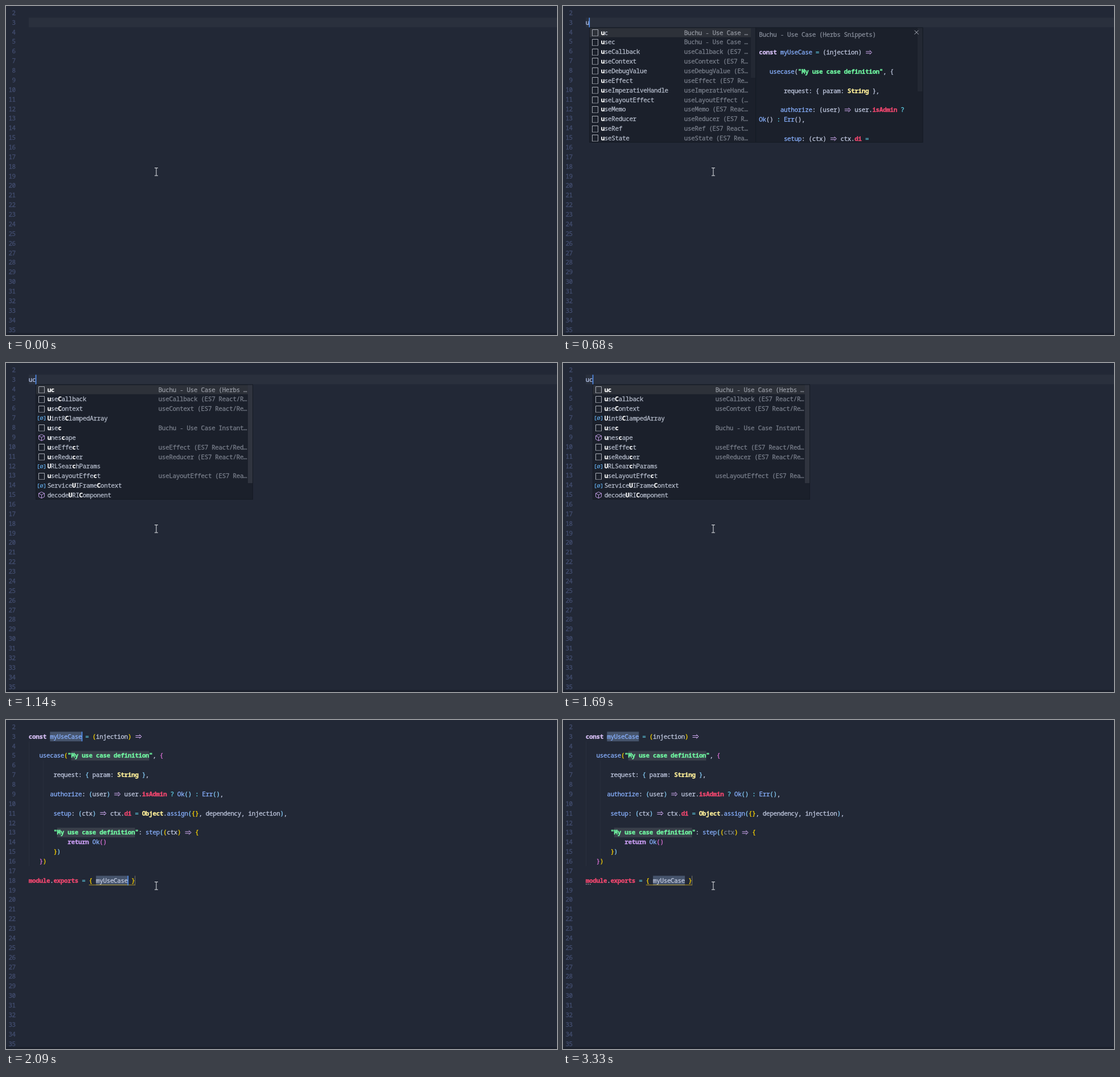
Write an HTML page with a canvas that moves like this. It is 968 px wide and 578 px high and loops after 3790 ms.

```html
<!DOCTYPE html>
<html lang="en">
<head>
<meta charset="utf-8">
<title>Snippet completion</title>
<style>
  html, body { margin: 0; width: 100%; height: 100%; overflow: hidden; background: #222836; }
  canvas { display: block; width: 968px; height: 578px; }
</style>
</head>
<body>
<canvas id="stage" width="968" height="578"></canvas>
<script>
const W = 968, H = 578, LOOP = 3790;
const CHAR = 6.22, LINE = 16.87, LEFT = 40, SIZE = 10.9;
const canvas = document.getElementById('stage');
const ctx = canvas.getContext('2d');

const PLAIN = '#bfc7de';
const COLORS = {
  d: PLAIN, k: '#d6bff5', b: '#86aefb', c: '#5fcfe6', a: '#cfa9f0',
  g: '#70f8a2', y: '#fff09a', r: '#f2476f', p: '#c79bf0'
};
const WEIGHTS = { y: 700, k: 600, g: 600, r: 600, p: 600 };
const BRACKETS = ['#ffd700', '#da70d6', '#87cefa'];

// Each token is a colour key followed by its text; tokens are split by "~".
const CODE = {
  3: 'kconst~d ~bmyUseCase~d ~c=~d (injection) ~a=>',
  5: 'd   ~busecase~d(~g"My use case definition"~d, {',
  7: 'd       request: { param: ~yString~d },',
  9: 'd      ~bauthorize~d: (user) ~a=>~d user.~risAdmin~d ~c?~d ~bOk~d() ~c:~d ~bErr~d(),',
  11: 'd       ~bsetup~d: (ctx) ~a=>~d ctx.~rdi~d ~c=~d ~yObject~d.~bassign~d({}, dependency, injection),',
  13: 'd       ~g"My use case definition"~d: ~bstep~d((ctx) ~a=>~d {',
  14: 'd           ~preturn~d ~bOk~d()',
  15: 'd       })',
  16: 'd   })',
  18: 'rmodule~d.~rexports~d ~c=~d { myUseCase }'
};

const DOCS = [
  [81.5, 'kconst~d ~bmyUseCase~d ~c=~d (injection) ~a=>'],
  [115.2, 'd   ~busecase~d(~g"My use case definition"~d, {'],
  [149, 'd       request: { param: ~yString~d },'],
  [182.5, 'd      ~bauthorize~d: (user) ~a=>~d user.~risAdmin~d ~c?'],
  [199.4, 'bOk~d() ~c:~d ~bErr~d(),'],
  [233.2, 'd       ~bsetup~d: (ctx) ~a=>~d ctx.~rdi~d ~c=']
];

// "^" marks the next letter as matched.
const LIST_U = ('^uc ^usec ^useCallback ^useContext ^useDebugValue ^useEffect ' +
  '^useImperativeHandle ^useLayoutEffect ^useMemo ^useReducer ^useRef ^useState').split(' ');
const LIST_UC = ('^u^c ^use^Callback ^use^Context ^Uint8^ClampedArray ^use^c ^unes^cape ' +
  '^useEffe^ct ^useRedu^cer ^URLSear^chParams ^useLayoutEffe^ct ' +
  'Service^UIFrame^Context decode^URI^Component').split(' ');
const METHODS = ['unescape', 'decodeURIComponent'];

const lineY = n => 29 + (n - 3) * LINE;
const colX = c => LEFT + c * CHAR;

function rect(x, y, w, h, color) {
  ctx.fillStyle = color;
  ctx.fillRect(x, y, w, h);
}

function path(points, color, width = 1, close = false) {
  ctx.beginPath();
  points.forEach(([x, y], i) => i ? ctx.lineTo(x, y) : ctx.moveTo(x, y));
  if (close) ctx.closePath();
  ctx.strokeStyle = color;
  ctx.lineWidth = width;
  ctx.stroke();
}

function arrow(x, y, color) {
  path([[x + 1, y - 1.5], [x + 9.5, y - 1.5]], color);
  path([[x + 1, y + 1.5], [x + 9.5, y + 1.5]], color);
  path([[x + 7.6, y - 3.7], [x + 11.6, y], [x + 7.6, y + 3.7]], color);
}

// One character, centred in its grid cell; the thin outline gives it body.
function glyph(ch, x, y, color, weight = 500) {
  if (ch === ' ') return;
  ctx.font = `${weight} ${SIZE}px "Noto Sans Mono", "DejaVu Sans Mono", monospace`;
  ctx.textAlign = 'center';
  ctx.fillStyle = ctx.strokeStyle = color;
  ctx.lineWidth = .3;
  ctx.fillText(ch, x + CHAR / 2, y + 3.7);
  ctx.strokeText(ch, x + CHAR / 2, y + 3.7);
}

function text(str, x, y, color, weight) {
  [...str].forEach((ch, i) => glyph(ch, x + i * CHAR, y, color, weight));
}

function tokens(line, x, y, colored, pick) {
  for (const token of line.split('~')) {
    const key = token[0], str = token.slice(1);
    const color = colored ? COLORS[key] : PLAIN;
    if (str === '=>') {
      arrow(x, y, color);
    } else {
      [...str].forEach((ch, i) =>
        glyph(ch, x + i * CHAR, y, pick && pick(ch) || color, colored ? WEIGHTS[key] : 500));
    }
    x += str.length * CHAR;
  }
}

function bracketPicker() {
  let depth = 0;
  return ch => {
    if ('({'.includes(ch)) return BRACKETS[depth++ % 3];
    if (')}'.includes(ch)) return BRACKETS[--depth % 3];
  };
}

function icon(kind, x, y) {
  if (kind === 'snippet') {
    const c = '#a9adb6', top = y - 5.5, bottom = y + 5.5;
    path([[x + .5, bottom], [x + .5, top], [x + 10.5, top], [x + 10.5, bottom]], c);
    ctx.setLineDash([1.5, .7]);
    path([[x, bottom], [x + 11, bottom]], c);
    ctx.setLineDash([]);
  } else if (kind === 'method') {
    const c = '#b896dc', m = x + 5.5;
    path([[m, y - 5.5], [x + 10.5, y - 3], [x + 10.5, y + 3], [m, y + 5.5],
      [x + .5, y + 3], [x + .5, y - 3]], c, 1, true);
    path([[x + .5, y - 3], [m, y - .3], [x + 10.5, y - 3]], c);
    path([[m, y - .3], [m, y + 5.5]], c);
  } else {
    const c = '#62aff0';
    path([[x + 1.5, y - 3.5], [x - .5, y - 3.5], [x - .5, y + 3.5], [x + 1.5, y + 3.5]], c);
    path([[x + 9.5, y - 3.5], [x + 11.5, y - 3.5], [x + 11.5, y + 3.5], [x + 9.5, y + 3.5]], c);
    ctx.beginPath();
    ctx.arc(x + 5.5, y, 2.4, 0, 7);
    ctx.stroke();
    path([[x + 2.8, y + 2.7], [x + 8.2, y - 2.7]], c);
  }
}

function detailOf(name) {
  if (name === 'uc') return 'Buchu - Use Case (Herbs Snippets)';
  if (name === 'usec') return 'Buchu - Use Case Instantiate (Herbs Snippets)';
  return name.startsWith('use') ? name + ' (ES7 React/Redux/GraphQL snippets)' : '';
}

function suggestions(list, x, width, detailX, chars, thumbH, thumbColor) {
  rect(x, 38, width, 201.5, '#1b202b');
  rect(x, 38.5, width, LINE - .5, '#2d3139');
  rect(x + width - 9, 38, 9, thumbH, thumbColor);
  list.forEach((item, row) => {
    const y = 46.8 + row * LINE;
    const name = item.replaceAll('^', '');
    const detail = detailOf(name);
    icon(detail ? 'snippet' : METHODS.includes(name) ? 'method' : 'variable', x + 4, Math.round(y));
    let tx = x + 19.8, hit = false;
    for (const ch of item) {
      if (ch === '^') { hit = true; continue; }
      glyph(ch, tx, y, hit ? '#ffffff' : '#b3bac9', hit ? 700 : 500);
      hit = false;
      tx += CHAR;
    }
    if (detail) text(detail.slice(0, chars - 1) + '…', detailX, y, row ? '#787e8a' : '#92969f');
  });
  border(x, width);
}

function border(x, width) {
  ctx.strokeStyle = '#151a24';
  ctx.lineWidth = 1;
  ctx.strokeRect(x - .5, 38, width, 201.5);
}

function docs(x, thumbColor) {
  rect(x, 38, 293, 201.5, '#1b202b');
  rect(x + 283.5, 38, 9, 112, thumbColor);
  text('Buchu - Use Case (Herbs Snippets)', x + 5, 50, '#858b98');
  path([[x + 278, 42.8], [x + 285, 49.8]], '#b0b5c0');
  path([[x + 285, 42.8], [x + 278, 49.8]], '#b0b5c0');
  for (const [y, line] of DOCS) tokens(line, x + 5, y, true);
  border(x, 293);
}

function caret(x, n) {
  rect(x, lineY(n) - 8.4, 1.6, LINE, '#5290f0');
}

function base() {
  rect(0, 0, W, H, '#222836');
  rect(0, 574.5, W, 3.5, '#1b202c');
  for (let n = 2; n <= 35; n++) {
    text(String(n), 17 - String(n).length * CHAR, lineY(n), '#434e70', 400);
  }
}

function typing(t) {
  rect(LEFT, 20.5, W - LEFT, LINE, '#2a303d');
  if (t < 450) return;
  const word = t < 760 ? 'u' : 'uc';
  text(word, LEFT, 29, t < 530 ? PLAIN : '#b5c4ea');
  if (t >= 1140) {
    suggestions(LIST_UC, 53, 381, 268, 25, 173, '#30343f');
  } else if (t >= 760) {
    suggestions(LIST_UC, 53, 292, 219, 18, 173, '#363b45');
    docs(345.5, '#323741');
  } else if (t >= 680) {
    suggestions(LIST_U, 47, 292, 213, 18, 88, '#232833');
    docs(339.5, '#232833');
  }
  if (t < 1220 || t >= 1690) caret(colX(word.length) - .7, 3);
}

function block(col, length, n, color) {
  rect(colX(col), lineY(n) - 8.4, length * CHAR, LINE, color);
}

function guide(col, from, to) {
  rect(colX(col), lineY(from) - 8.4, 1, (to - from + 1) * LINE, '#292f3e');
}

function inserted(t) {
  guide(0, 4, 16);
  guide(4, 6, 15);
  block(6, 9, 3, '#46546c');
  block(19, 9, 18, '#46546c');
  block(12, 22, 5, '#393f4a');
  block(8, 22, 13, '#393f4a');

  const pick = t >= 2090 ? bracketPicker() : null;
  for (const [n, line] of Object.entries(CODE)) {
    const y = lineY(+n);
    tokens(line, LEFT, y, t >= 1920 || n === '3', pick);
    if (n === '13' && t >= 2240) {
      rect(colX(39), y - 6, 3 * CHAR, 12, '#222836');
      text('ctx', colX(39), y, '#788093');
    }
  }

  rect(226.2, lineY(18) - 8.4, 1, LINE, '#77756a');
  if (t >= 2090) rect(colX(17), 289.3, 13 * CHAR, 1, '#b99a26');
  if (t >= 2240) {
    for (let i = 0; i < 3; i++) rect(40.2 + i * 3.4, 287.8, 1.4, 1.4, '#b4b8c0');
  }
  if (t < 2390 || (t >= 2850 && t < 3330)) {
    caret(colX(15) - .6, 3);
    caret(colX(28) - .6, 18);
  }
}

function pointer() {
  const c = '#dfe2e6';
  rect(263.5, 285, 1, 13, c);
  rect(261, 284, 6, 1, c);
  rect(261, 297.5, 6, 1, c);
}

function frame(now) {
  const t = (now - start) % LOOP;
  base();
  if (t < 1850) typing(t);
  else inserted(t);
  pointer();
  requestAnimationFrame(frame);
}

const start = performance.now();
requestAnimationFrame(() => frame(performance.now()));
</script>
</body>
</html>
```
